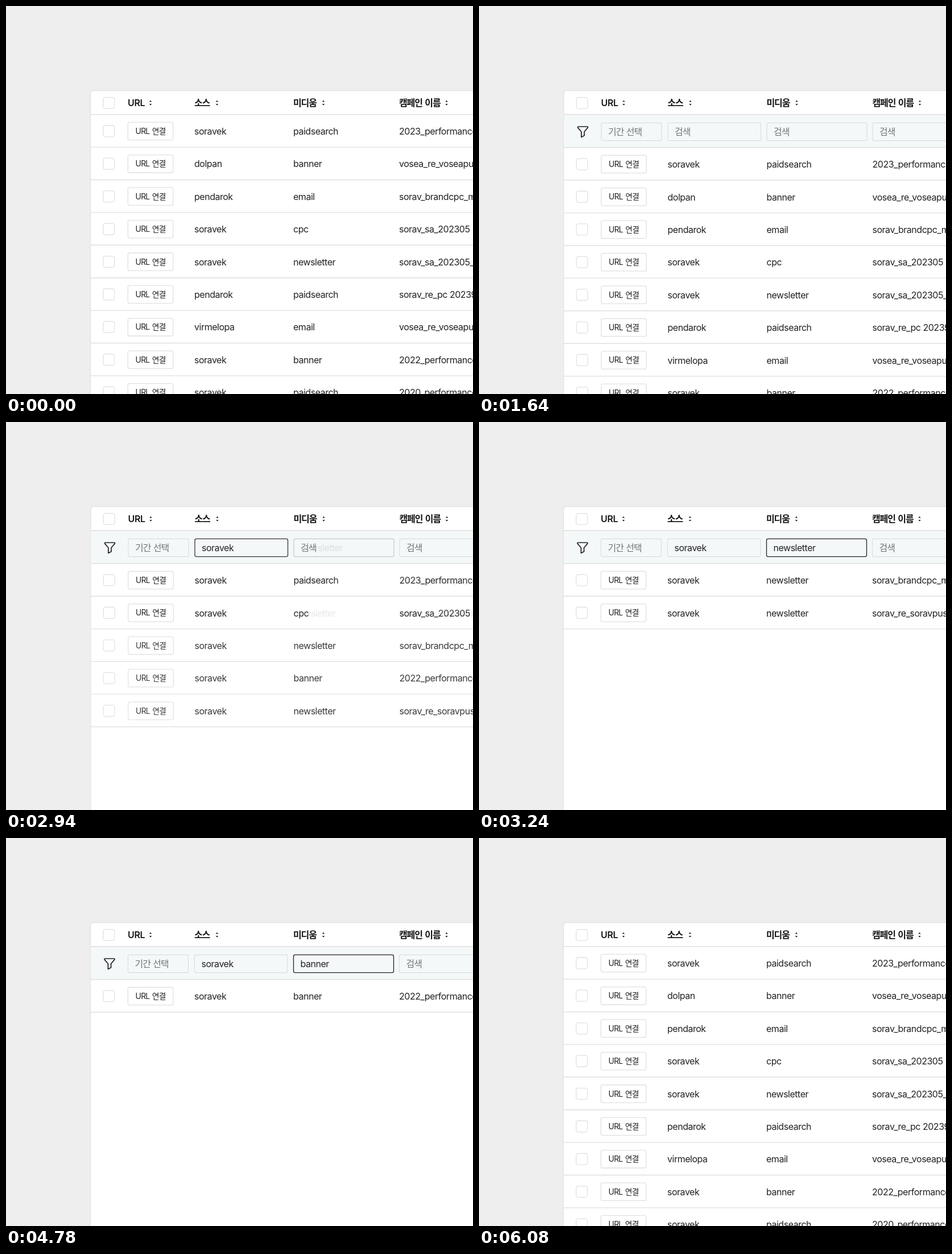
Recreate the animation shown at these times as an HTML page. Size 821 by 682 pixels, loop 6990 ms.

```html
<!DOCTYPE html>
<html lang="ko">
<head>
<meta charset="utf-8">
<style>
html, body { margin: 0; width: 100%; height: 100%; overflow: hidden; background: #eee; }
svg { display: block; }
text { font: 16px Inter, "Noto Sans CJK KR", sans-serif; letter-spacing: -.03em; fill: #222; }
.head { font-weight: 600; letter-spacing: -.07em; word-spacing: .1em; fill: #161616; }
.latin { letter-spacing: -.02em; }
.hint { letter-spacing: -.065em; word-spacing: .06em; fill: #727676; }
.btn { font-size: 13.8px; letter-spacing: -.05em; word-spacing: .08em; }
.box { fill: #fff; stroke: #e1e1e1; stroke-width: 1.3; }
.field { fill: #f4f8f9; stroke: #dadddd; stroke-width: 1.1; }
.active { stroke: #222; stroke-width: 1.3; }
.line { stroke: #e0e0e0; stroke-width: 1.4; }
</style>
</head>
<body>
<svg id="stage" width="821" height="682" viewBox="0 0 821 682"></svg>
<script>
const LOOP = 6990, STEPS = 5, TOP = 190.7, ROW = 57.4;
const COLS = [214, 331, 505, 691];

// source, medium, campaign
const all = [
  ['soravek', 'paidsearch', '2023_performance'],
  ['dolpan', 'banner', 'vosea_re_voseapush'],
  ['pendarok', 'email', 'sorav_brandcpc_mo'],
  ['soravek', 'cpc', 'sorav_sa_202305'],
  ['soravek', 'newsletter', 'sorav_sa_202305_pc'],
  ['pendarok', 'paidsearch', 'sorav_re_pc 202390'],
  ['virmelopa', 'email', 'vosea_re_voseapush'],
  ['soravek', 'banner', '2022_performance'],
  ['soravek', 'paidsearch', '2020_performance']
];
const brand = ['soravek', 'newsletter', 'sorav_brandcpc_mo'];
const push = ['soravek', 'newsletter', 'sorav_re_soravpush'];
const bySource = [all[0], all[3], brand, all[7], push];

// rows, filter values (null hides the filter bar), active field
const views = [
  [all, null],
  [all, ['', '']],
  [bySource, ['soravek', ''], 1],
  [[brand, push], ['soravek', 'newsletter'], 2],
  [[all[7]], ['soravek', 'banner'], 2],
  [all, null]
];
const fades = [[170, 470], [1640, 2030], [2850, 3240], [4390, 4780], [5680, 6080]];

const text = (x, y, s, cls = '') => `<text class="${cls}" x="${x}" y="${y}">${s}</text>`;
const rect = (x, y, w, h, r, cls) =>
  `<rect class="${cls}" x="${x}" y="${y}" width="${w}" height="${h}" rx="${r}"/>`;
const line = y => `<path class="line" d="M149 ${y}H830"/>`;
const check = y => rect(170.8, y, 19.8, 19.8, 3.5, 'box');

function row(cells, y) {
  return check(y + 19.3) + rect(214.3, y + 13.7, 79.5, 31.2, 3, 'box') +
    text(227.6, y + 34.2, 'URL 연결', 'btn') +
    cells.map((s, i) => text(COLS[i + 1], y + 35.35, s)).join('') + line(y + ROW);
}

function filterBar(values, active) {
  const widths = [106, 163.5, 176, 180];
  const fields = ['', ...values, ''].map((s, i) => {
    const hint = i ? '검색' : '기간 선택';
    return rect(COLS[i] + .5, 205.4, widths[i], 31.2, 2.5, 'field' + (i === active ? ' active' : '')) +
      text(COLS[i] + 12.5, 226.8, s || hint, s ? '' : 'hint');
  });
  return `<rect x="149" y="191" width="680" height="58" fill="#f4f8f9"/>` + line(248.8) +
    `<path d="M174 212H190Q191.6 212.3 190.7 213.9L184.6 221V227.8L179.4 230.4V221L173.3 213.9Q172.4 212.3 174 212Z"
      fill="none" stroke="#222" stroke-width="1.7" stroke-linejoin="round"/>` + fields.join('');
}

function view([rows, values, active]) {
  const top = values ? TOP + 58.1 : TOP;
  return `<g class="view"><rect x="149.2" y="191" width="680" height="500" fill="#fff"/>` +
    (values ? filterBar(values, active) : '') +
    rows.map((cells, i) => row(cells, top + i * ROW)).join('') + '</g>';
}

const titles = ['URL', '소스', '미디움', '캠페인 이름'];
const sorts = [254, 371, 558, 774.5];
const header = check(160.6) + titles.map((s, i) =>
  text(COLS[i], 176.4, s, i ? 'head' : 'head latin') +
  `<path d="M${sorts[i] - 2.2} 168.6l2.2-2.8 2.2 2.8zm0 3.4l2.2 2.8 2.2-2.8z" fill="#222"/>`).join('');

const stage = document.getElementById('stage');
stage.innerHTML = `<g id="card">${rect(148.5, 148.5, 700, 560, 5, 'box')}${header}` +
  views.map(view).join('') + line(TOP) + '</g>';
const card = document.getElementById('card');
const layers = [...stage.querySelectorAll('.view')];

function draw(now) {
  const t = now % LOOP;
  const done = fades.filter(f => t >= f[1]).length;
  const fade = fades[done];
  const moving = fade && t >= fade[0];
  const u = moving ? Math.floor((t - fade[0]) / (fade[1] - fade[0]) * STEPS) / STEPS : 0;
  layers.forEach((g, i) => {
    g.style.display = i === done || (moving && i === done + 1) ? '' : 'none';
    g.style.opacity = i > done ? u * u * (3 - 2 * u) : 1;
  });
  // the card sits half a pixel to the right while dissolving
  card.setAttribute('transform', moving ? 'translate(.5 0)' : '');
  requestAnimationFrame(() => draw(performance.now() - start));
}
const start = performance.now();
draw(0);
</script>
</body>
</html>
```
